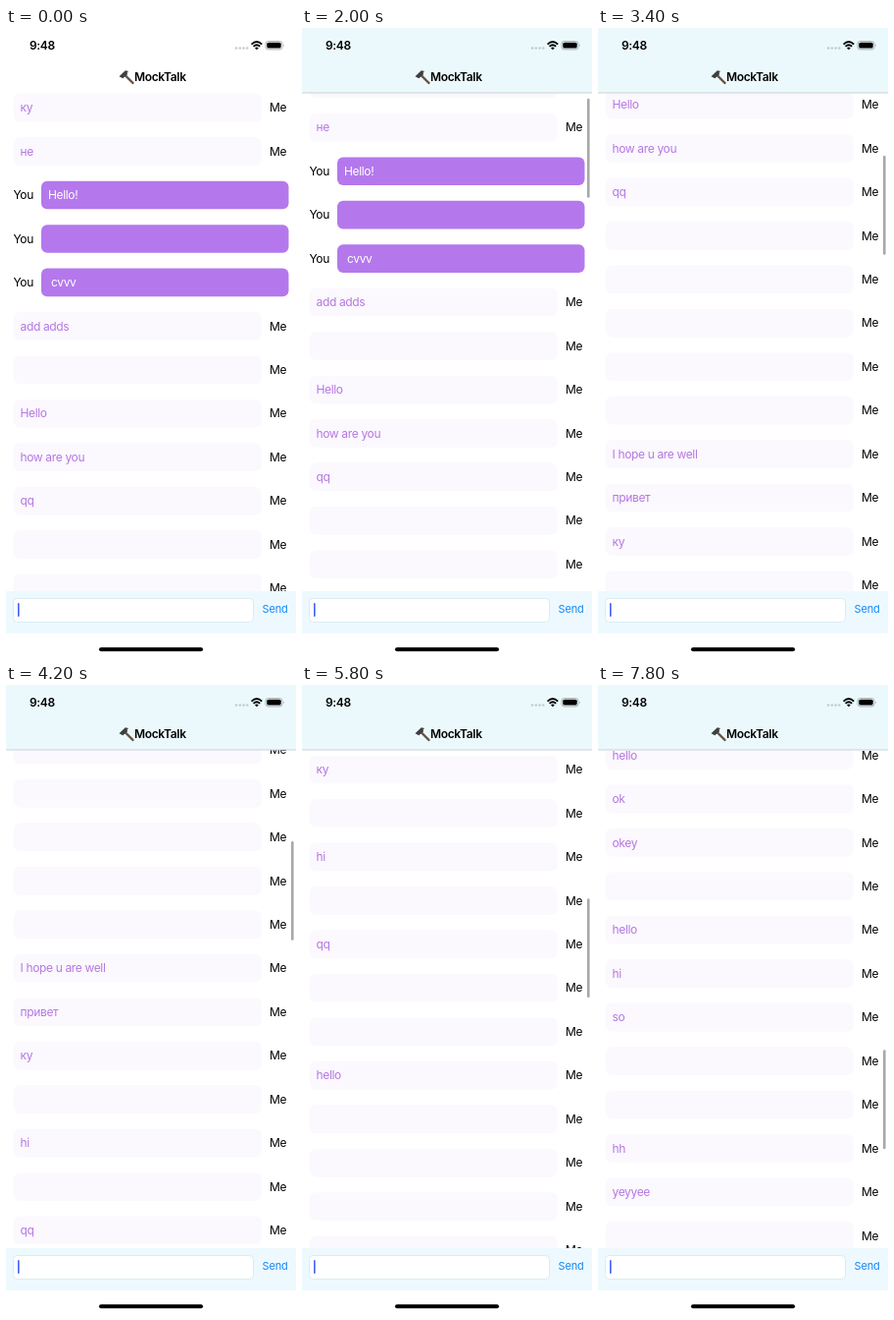
Animation of 296x640 px, one loop 8 s. Source, as an HTML page:

```html
<!DOCTYPE html>
<html lang="en">
<head>
<meta charset="utf-8">
<title>Chat</title>
<style>
  html, body { margin: 0; width: 100%; height: 100%; overflow: hidden; background: #fff; }
  svg { display: block; width: 296px; height: 640px; }
  text { font: 12px Inter, "Noto Sans", sans-serif; letter-spacing: -0.35px; white-space: pre; }
  .bold { font-weight: 600; }
  .mine { fill: #b478e0; }
  .yours { fill: #fff; }
</style>
</head>
<body>
<svg viewBox="0 0 296 640">
  <defs><clipPath id="viewport"><rect y="66" width="296" height="507"/></clipPath></defs>

  <g clip-path="url(#viewport)"><g id="rows"></g></g>

  <g id="navBar">
    <rect width="296" height="66" fill="#ecf9fc"/>
    <rect y="65.5" width="296" height="1" fill="#c9d3d6"/>
  </g>
  <rect id="scrollBar" x="291" width="2.6" height="101" rx="1.3" fill="#a8a8a8"/>

  <text class="bold" x="24" y="22">9:48</text>
  <g fill="#c4cccf">
    <circle cx="235" cy="20.5" r="1.3"/><circle cx="238.8" cy="20.5" r="1.3"/>
    <circle cx="242.6" cy="20.5" r="1.3"/><circle cx="246.2" cy="20.5" r="1.3"/>
  </g>
  <g fill="none" stroke="#000" stroke-width="1.9">
    <path d="M250.6 16.6Q255.9 11.6 261.2 16.6"/>
    <path d="M252.6 18.8Q255.9 15.8 259.2 18.8"/>
  </g>
  <path d="M254 20.3Q255.9 18.8 257.8 20.3L255.9 22.3Z"/>
  <rect x="265" y="13.5" width="17" height="8.4" rx="2.5" fill="none" stroke="#9b9fa0" stroke-width=".8"/>
  <rect x="266.3" y="14.8" width="14.4" height="5.8" rx="1.5"/>
  <path d="M283 16.2q1.4 1.5 0 3z" fill="#9b9fa0"/>

  <path d="M121 47.5L129.5 56" stroke="#66503f" stroke-width="2.4" stroke-linecap="round"/>
  <path d="M115.5 49.3L121.8 43.2L125 44L123.6 45.5L124 47.2L119.3 51.2L117.8 50.4Z" fill="#3d4042"/>
  <text class="bold" x="131" y="54.3">MockTalk</text>

  <rect y="573" width="296" height="43" fill="#edf9ff"/>
  <rect x="7.5" y="580.5" width="245" height="24" rx="4" fill="#fff" stroke="#dcebf2"/>
  <rect id="caret" x="12" y="585" width="1.6" height="14" rx=".8" fill="#4161f2"/>
  <text x="261.5" y="595" style="font-size:11px;letter-spacing:-.15px" fill="#1688f5">Send</text>
  <rect x="95" y="630.2" width="106" height="4" rx="2"/>
</svg>

<script>
const LOOP = 8000, STEP = 200, ROW = 44.45, FIRST_ROW = 81, BLINK = 960;
const ROW_COUNT = 47;
const messages = {
  0: "ку", 1: "не", 2: "Hello!", 4: " cvvv", 5: "add adds", 7: "Hello", 8: "how are you", 9: "qq",
  15: "I hope u are well", 16: "привет", 17: "ку", 19: "hi", 21: "qq", 24: "hello",
  34: "hello", 35: "ok", 36: "okey", 38: "hello", 39: "hi", 40: "so", 43: "hh", 44: "yeyyee"
};
// [time in ms, scroll offset in px]
const scrollKeys = [[0, 0], [1600, 0], [2000, 24.3], [2600, 160.6], [4200, 459.6],
  [5800, 750.7], [6600, 1040.4], [7800, 1521]];

const byId = id => document.getElementById(id);
const [rows, navBar, scrollBar, caret] = ["rows", "navBar", "scrollBar", "caret"].map(byId);

function rowMarkup(index) {
  const y = FIRST_ROW + index * ROW;
  const yours = index >= 2 && index <= 4;
  const [x, fill, type] = yours ? [36, "#b478ec", "yours"] : [8, "#fbf8fe", "mine"];
  const label = yours ? ["You", 7.5] : ["Me", 269];
  return `<rect x="${x}" y="${y - 14.2}" width="252.5" height="28.6" rx="6" fill="${fill}"/>
    <text class="${type}" x="${x + (yours ? 7 : 6.5)}" y="${y + 4.3}">${messages[index] || ""}</text>
    <text x="${label[1]}" y="${y + 4.3}">${label[0]}</text>`;
}
rows.innerHTML = Array.from({ length: ROW_COUNT }, (_, i) => rowMarkup(i)).join("");

const slope = i => {
  const [a, b] = [scrollKeys[i], scrollKeys[i + 1]];
  return a && b ? (b[1] - a[1]) / (b[0] - a[0]) : 0;
};
// Harmonic mean of neighbouring slopes keeps the scroll monotone.
const tangent = i => {
  const before = slope(i - 1), after = slope(i);
  return before && after ? 2 * before * after / (before + after) : before;
};

function scrollAt(time) {
  const i = scrollKeys.findIndex((key, k) => k && time <= key[0]) - 1;
  if (i < 0) return scrollKeys.at(-1)[1];
  const [t0, s0] = scrollKeys[i], [t1, s1] = scrollKeys[i + 1];
  const span = t1 - t0, u = (time - t0) / span, v = 1 - u;
  return s0 * v * v * (1 + 2 * u) + s1 * u * u * (3 - 2 * u)
    + span * u * v * (v * tangent(i) - u * tangent(i + 1));
}

function caretOpacity(time) {
  const phase = time % BLINK;
  const fadeOut = (770 - phase) / 80, fadeIn = (phase - 870) / 60;
  return Math.min(1, Math.max(0, fadeOut, fadeIn));
}

const start = performance.now();
function draw() {
  const elapsed = (performance.now() - start) % LOOP;
  const time = Math.floor(elapsed / STEP) * STEP;
  const scroll = scrollAt(time);
  const shown = scroll > 0 ? 1 : 0;
  rows.setAttribute("transform", `translate(0 ${-scroll})`);
  scrollBar.setAttribute("y", 67 + scroll * 0.2);
  scrollBar.setAttribute("opacity", shown);
  navBar.setAttribute("opacity", shown);
  caret.setAttribute("opacity", caretOpacity(time));
  requestAnimationFrame(draw);
}
draw();
</script>
</body>
</html>
```
